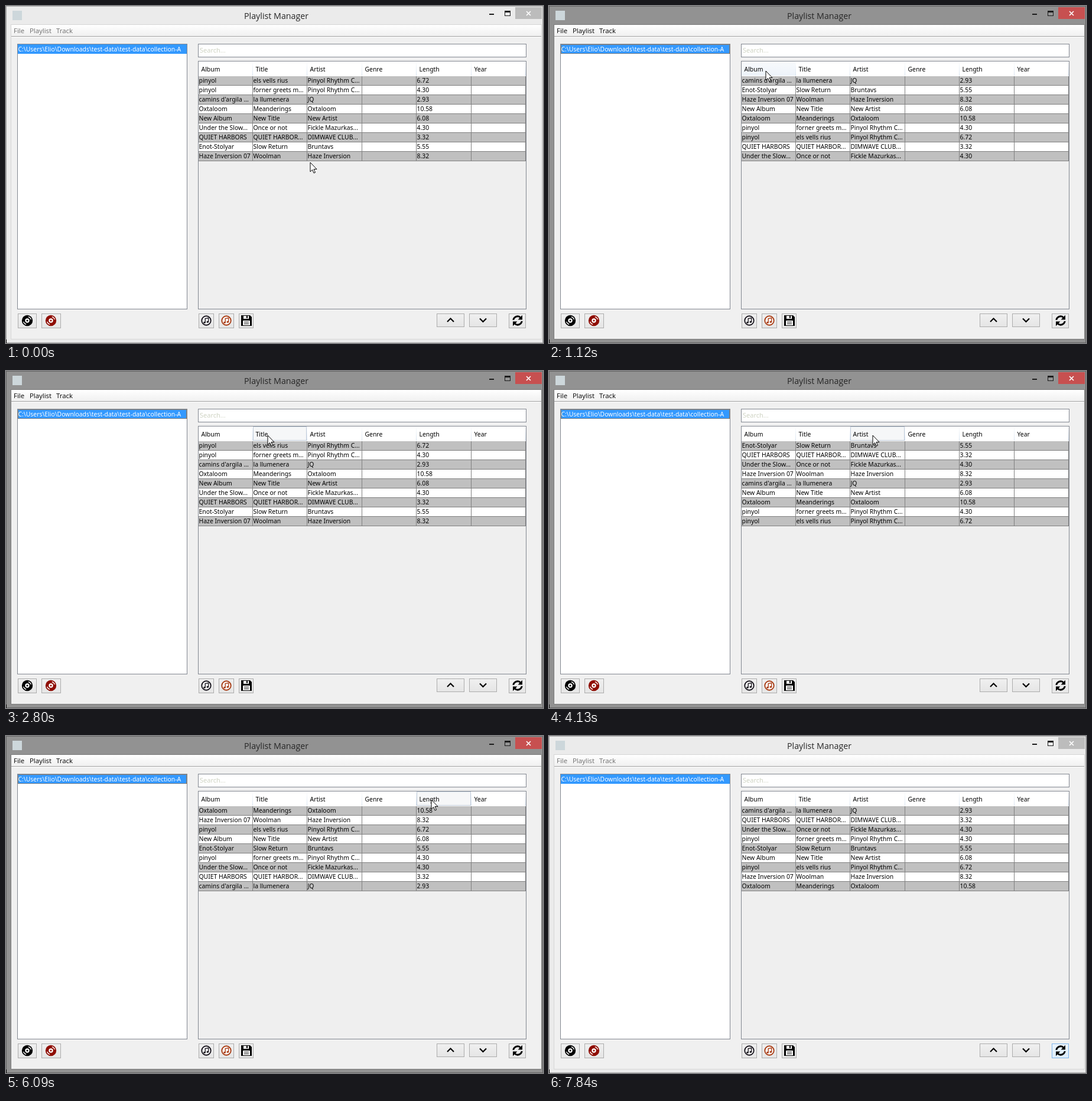
These frames come from a looping animation (909x571 px, 7.91 s). An HTML page:

```html
<!DOCTYPE html>
<html lang="en">
<head>
<meta charset="utf-8">
<title>Playlist Manager</title>
<style>
  html, body { margin: 0; width: 100%; height: 100%; overflow: hidden; }
  svg { display: block; width: 909px; height: 571px; }
  text { font: 10.4px "Noto Sans", "Open Sans", sans-serif; white-space: pre; }
  .ui { font-family: "Open Sans", "Noto Sans", sans-serif; }
  rect, .crisp { shape-rendering: crispEdges; }
</style>
</head>
<body>
<svg id="stage" viewBox="0 0 909 571" xmlns="http://www.w3.org/2000/svg">
  <defs>
    <linearGradient id="face" x2="0" y2="1"><stop stop-color="#f0f0f0"/><stop offset="1" stop-color="#e5e5e5"/></linearGradient>
    <linearGradient id="faceHot" x2="0" y2="1"><stop stop-color="#ecf4fc"/><stop offset="1" stop-color="#dcecfc"/></linearGradient>
    <linearGradient id="menuBar" x2="0" y2="1"><stop stop-color="#fff"/><stop offset="1" stop-color="#f0f0f0"/></linearGradient>
    <linearGradient id="headHot" x2="0" y2="1"><stop stop-color="#f8fafc"/><stop offset="1" stop-color="#edf3fa"/></linearGradient>
    <linearGradient id="divider" x2="0" y2="1"><stop stop-color="#fff"/><stop offset="1" stop-color="#d5e1ef"/></linearGradient>
    <g id="disc">
      <circle r="9.2"/>
      <circle r="3.7" fill="#fff"/>
      <circle r="1.5"/>
      <path d="M1.8-6.4A6.6 6.6 0 0 1 6.4-1.8M-1.8 6.4A6.6 6.6 0 0 1-6.4 1.8" fill="none" stroke="#fff" stroke-width="1.3"/>
    </g>
    <g id="note">
      <circle r="7.7" fill="#fff" stroke="currentColor" stroke-width="1.9"/>
      <path d="M-1.8 3V-3.4L3.6-4.4V2" fill="none" stroke="currentColor" stroke-width="1.4"/>
      <ellipse cx="-3" cy="3.2" rx="1.9" ry="1.5" fill="currentColor"/>
      <ellipse cx="2.4" cy="2.2" rx="1.9" ry="1.5" fill="currentColor"/>
    </g>
    <path id="turn" d="M-8.6-1A8.6 8.6 0 0 1 5.4-6.6L8-9.2V-1.6H.6L3.4-4.6A5.9 5.9 0 0 0-5.8-1Z"/>
  </defs>
  <g id="back"></g>
  <g id="heads"></g>
  <g id="rows"></g>
  <g id="front"></g>
  <path id="pointer" d="M.5.5V16.3L4.1 12.9 6.6 18.6 9 17.6 6.5 12H11.5Z" fill="#fff" stroke="#000"/>
</svg>
<script>
const LOOP = 7910, STEP = 70;
const $ = id => document.getElementById(id);

function add(parent, tag, attrs, content) {
  const el = document.createElementNS("http://www.w3.org/2000/svg", tag);
  for (const k in attrs) el.setAttribute(k, attrs[k]);
  if (content !== undefined) el.textContent = content;
  parent.appendChild(el);
  return el;
}
const box = (p, x, y, w, h, fill) => add(p, "rect", { x, y, width: w, height: h, fill });
const frame = (p, x, y, w, h, fill, stroke) =>
  add(p, "rect", { x: x + .5, y: y + .5, width: w - 1, height: h - 1, fill, stroke });
const label = (p, x, y, s, fill = "#000") => add(p, "text", { x, y, fill }, s);
const line = (p, d, stroke, width = 1) => add(p, "path", { d, stroke, "stroke-width": width, fill: "none" });

function uiLabel(p, x, y, s, size) {
  const el = label(p, x, y, s);
  el.setAttribute("class", "ui");
  el.style.fontSize = size + "px";
  return el;
}

// Window
const back = $("back"), front = $("front");
const shell = frame(back, 0, 0, 909, 571, "#ebebeb", "#a6a6a6");
box(back, 0, 565, 1, 6, "#000");
const inner = frame(back, 8, 31, 899, 534, "#f0f0f0", "#d6d6d6");
box(back, 9, 32, 897, 19, "url(#menuBar)");
box(back, 9, 51, 897, 1, "#a0a0a0");
box(back, 9, 52, 897, 1, "#fff");
box(back, 11, 8, 16, 16, "#cdd7db");
uiLabel(back, 403, 22, "Playlist Manager", 14.25).setAttribute("fill", "#262626");
const menus = [["File", 13], ["Playlist", 40], ["Track", 85]].map(([s, x]) => uiLabel(back, x, 46, s, 11.4));
box(back, 818, 13, 8, 2, "#1c1c1c");
frame(back, 844, 8, 10, 9, "none", "#1c1c1c");
box(back, 844, 8, 10, 3, "#1c1c1c");
const closer = box(back, 862, 2, 45, 20, "#bcbcbc");
line(back, "M881 9L888 16M888 9L881 16", "#fff", 1.7);

// Folder list and search field
frame(back, 19, 64, 288, 450, "#fff", "#828790");
box(back, 20, 65, 286, 16, "#39f");
const focusRing = frame(back, 20, 65, 286, 16, "none", "#c60");
focusRing.setAttribute("stroke-dasharray", "1 1");
label(back, 20.5, 77, "C:\\Users\\Elio\\Downloads\\test-data\\test-data\\collection-A", "#fff");
frame(back, 325, 64, 556, 23, "#fff", "#828790");
label(back, 328, 79, "Search...", "#cfd3c3").style.fontSize = "11px";

// Table
const COLS = [326, 418, 510, 603, 695, 788, 880];
const HEADS = ["Album", "Title", "Artist", "Genre", "Length", "Year"];
const TRACKS = [
  ["pinyol", "els vells rius", "Pinyol Rhythm C...", "6.72"],
  ["pinyol", "forner greets m...", "Pinyol Rhythm C...", "4.30"],
  ["camins d'argila ...", "la llumenera", "JQ", "2.93"],
  ["Oxtaloom", "Meanderings", "Oxtaloom", "10.58"],
  ["New Album", "New Title", "New Artist", "6.08"],
  ["Under the Slow...", "Once or not", "Fickle Mazurkas...", "4.30"],
  ["QUIET HARBORS", "QUIET HARBOR...", "DIMWAVE CLUB...", "3.32"],
  ["Enot-Stolyar", "Slow Return", "Bruntavs", "5.55"],
  ["Haze Inversion 07", "Woolman", "Haze Inversion", "8.32"]
];
frame(back, 325, 93, 556, 421, "#efefef", "#828790");
box(back, 326, 94, 554, 25, "#fff");
const cells = HEADS.map((s, i) => {
  const x = COLS[i], w = COLS[i + 1] - x;
  box($("heads"), x + w - 1, 94, 1, 24, "url(#divider)");
  const hot = box($("heads"), x, 94, w - 1, 24, "url(#headHot)");
  const down = frame($("heads"), x, 94, w - 1, 24, "#f6f7f8", "#c0cbd9");
  label($("heads"), x + 4.5, 111, s);
  return { hot, down };
});
for (let i = 0; i < 9; i++) {
  box($("rows"), 326, 119 + 16 * i, 554, 15, i % 2 ? "#fff" : "#c0c0c0");
  box($("rows"), 326, 134 + 16 * i, 554, 1, "#808080");
}
COLS.slice(1).forEach(x => box($("rows"), x - 1, 119, 1, 144, "#808080"));
const tracks = TRACKS.map(([album, title, artist, length]) => {
  const g = add($("rows"), "g", {});
  [album, title, artist, "", length].forEach((s, c) => s && label(g, COLS[c] + .5, 130, s));
  return g;
});

// Buttons
const button = (x, w, h) => frame(front, x, 521, w, h, "url(#face)", "#acacac");
const icon = (id, x, color) =>
  add(front, "use", { href: "#" + id, transform: `translate(${x} 533)`, fill: color, color });
button(20, 32, 25); icon("disc", 36, "#000");
button(60, 33, 25); icon("disc", 76, "#8f0d04");
button(326, 26, 25); icon("note", 339, "#17141c");
button(360, 26, 25); icon("note", 373, "#a83c14");
button(394, 25, 25);
add(front, "path", { d: "M398 524H413L416 527V542H398Z" });
box(front, 402, 525, 9, 5, "#fff");
box(front, 407, 525, 2, 4, "#000");
box(front, 401, 533, 12, 8, "#fff");
box(front, 403, 535, 8, 1, "#000");
box(front, 403, 538, 8, 1, "#000");
button(729, 47, 23); line(front, "M747 535L752.5 529.5 758 535", "#000", 2.2);
button(784, 47, 23); line(front, "M802 529.5L807.5 535 813 529.5", "#000", 2.2);
const refresh = button(851, 29, 25);
icon("turn", 866, "#000");
add(front, "use", { href: "#turn", transform: "translate(866 533) rotate(180)" });

// Timeline: [start, steps, x, y]
const MOVES = [
  [350, 9, 367, 110], [2170, 4, 443, 109], [3360, 7, 548, 109], [4550, 10, 715, 108],
  [5390, 2, 720, 108], [6650, 12, 846, 527], [7490, 5, 858, 558]
];
const SORTS = [
  [0, "012345678"], [1120, "278431065"], [1890, "561034872"], [2520, "012345678"],
  [2940, "876543210"], [3780, "765824310"], [4270, "103428567"],
  [5810, "380471562"], [6300, "265174083"]
];
// [from, to, column]
const PRESSES = [[1750, 1890, 0], [2800, 2940, 1], [4130, 4270, 2], [5600, 5810, 4], [6090, 6300, 4]];

function pointerAt(t) {
  let x = 515, y = 265;
  for (const [start, steps, tx, ty] of MOVES) {
    if (t < start) break;
    const p = Math.min(1, (Math.floor((t - start) / STEP) + 1) / steps);
    const e = p * p * (3 - 2 * p);
    x += (tx - x) * e;
    y += (ty - y) * e;
  }
  return [Math.round(x), Math.round(y)];
}

const show = (el, on) => el.setAttribute("visibility", on ? "visible" : "hidden");
const paint = (el, fill, stroke) => {
  el.setAttribute("fill", fill);
  if (stroke) el.setAttribute("stroke", stroke);
};

function draw(t) {
  const active = t >= 980 && t < 7840;
  paint(shell, active ? "#929292" : "#ebebeb", active ? "#646464" : "#a6a6a6");
  paint(inner, "#f0f0f0", active ? "#7c7c7c" : "#d6d6d6");
  paint(closer, active ? "#c75050" : "#bcbcbc");
  menus.forEach(m => paint(m, active ? "#000" : "#6d6d6d"));
  show(focusRing, active);

  const [x, y] = pointerAt(t);
  $("pointer").setAttribute("transform", `translate(${x - .5} ${y - .5})`);
  show($("pointer"), t < 7840);

  const press = PRESSES.find(([a, b]) => t >= a && t < b);
  cells.forEach((c, i) => {
    show(c.hot, y >= 94 && y < 119 && x >= COLS[i] && x < COLS[i + 1]);
    show(c.down, press && press[2] === i);
  });

  const order = SORTS.filter(s => t >= s[0]).pop()[1];
  tracks.forEach((g, i) => g.setAttribute("transform", `translate(0 ${16 * order.indexOf(i)})`));

  const over = t >= 7490;
  paint(refresh, over ? "url(#faceHot)" : "url(#face)", over ? "#7eb4ea" : "#acacac");
}

const begin = performance.now();
function tick() {
  draw((performance.now() - begin) % LOOP);
  requestAnimationFrame(tick);
}
tick();
</script>
</body>
</html>
```
